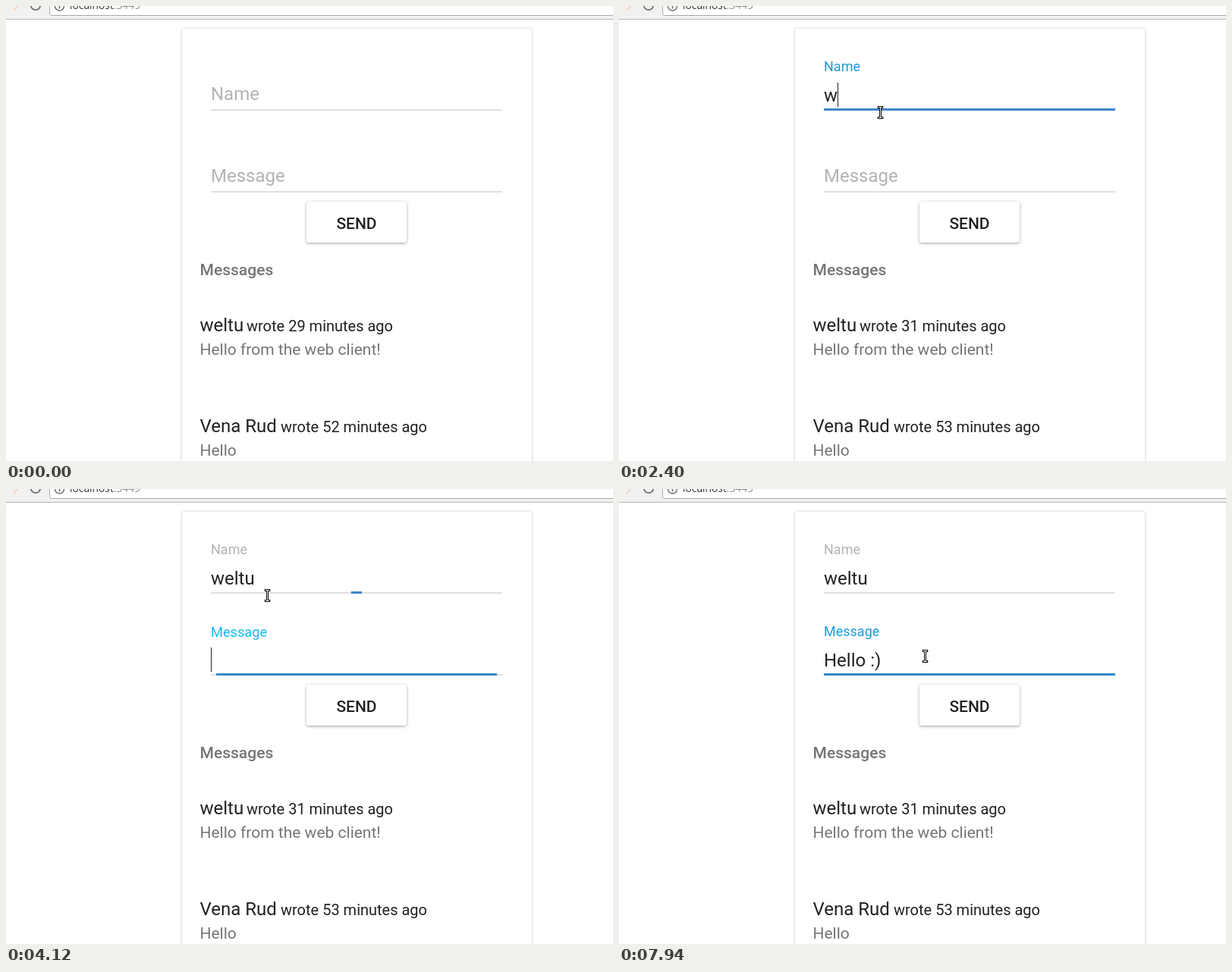
Animation, 800 px wide and 600 px high, one loop 7.99 s. Source, as an HTML page:

```html
<!DOCTYPE html>
<html lang="en">
<head>
<meta charset="utf-8">
<title>Message form</title>
<style>
html, body { margin: 0; width: 100%; height: 100%; overflow: hidden; background: #fff; }
body { position: relative; font-family: Roboto, sans-serif; }
.paper { position: absolute; background: #fff; border-radius: 3px; }
.card { left: 232px; top: 30px; width: 461px; height: 640px;
  box-shadow: 0 0 4px rgba(0, 0, 0, .2), 0 1px 2px rgba(0, 0, 0, .1); }
.button { left: 396px; top: 258px; width: 132px; height: 54px;
  box-shadow: 0 1px 4px rgba(0, 0, 0, .28), 0 1px 2px rgba(0, 0, 0, .12); }
svg { position: absolute; left: 0; top: 0; width: 800px; height: 600px; overflow: hidden; }
text { white-space: pre; fill: #212121; font-size: 24px; }
.small { font-size: 20px; }
.body { font-size: 21px; fill: #757575; }
.strong { font-size: 21px; font-weight: 500; }
.url { font: 13.8px "Open Sans", "Noto Sans", sans-serif; fill: #333; }

/* One loop is 7990 ms: name focus at 1690, message focus at 3780, 450 ms each */
.anim { --ease: cubic-bezier(.23, 1, .32, 1);
  animation-duration: 7990ms; animation-iteration-count: infinite; animation-timing-function: linear; }
.label { fill: #b3b3b3; }
.bar { transform-box: fill-box; transform-origin: center; }
#nameLabel { animation-name: nameFloat, nameTint; }
#messageLabel { animation-name: messageFloat, messageTint; }
#nameBar { fill: #3f85c8; animation-name: nameBar; }
#messageBar { fill: #358bc6; animation-name: messageBar; }
#messageLine { animation-name: thinLine; animation-timing-function: step-end; }

@keyframes nameFloat {
  0%, 21.151% { transform: translate(270px, 124px) scale(1); animation-timing-function: var(--ease); }
  26.783%, 100% { transform: translate(270px, 86px) scale(.75); }
}
@keyframes messageFloat {
  0%, 47.309% { transform: translate(270px, 232px) scale(1); animation-timing-function: var(--ease); }
  52.941%, 100% { transform: translate(270px, 194px) scale(.75); }
}
@keyframes nameTint {
  0%, 21.151% { fill: #b3b3b3; animation-timing-function: var(--ease); }
  26.75% { fill: #14b2ee; }
  26.783%, 47.309% { fill: #1f97d8; animation-timing-function: var(--ease); }
  52.941%, 100% { fill: #b3b3b3; }
}
@keyframes messageTint {
  0%, 47.309% { fill: #b3b3b3; animation-timing-function: var(--ease); }
  52.04% { fill: #10bcf2; }
  52.065%, 100% { fill: #149cdf; }
}
@keyframes nameBar {
  0%, 21.151% { transform: scaleX(0); animation-timing-function: var(--ease); }
  26.783%, 47.309% { transform: scaleX(1); animation-timing-function: var(--ease); }
  52.941%, 100% { transform: scaleX(0); }
}
@keyframes messageBar {
  0%, 47.309% { transform: scaleX(0); animation-timing-function: var(--ease); }
  52.941%, 100% { transform: scaleX(1); }
}
@keyframes thinLine {
  0% { y: 244px; height: 2px; }
  21.151% { y: 245px; height: 1px; }
  26.783%, 100% { y: 244px; height: 2px; }
}
</style>
</head>
<body>
<div class="paper card"></div>
<div class="paper button"></div>
<svg viewBox="0 0 800 600">
  <!-- browser toolbar -->
  <rect width="800" height="17" fill="#f2f1f0"/>
  <rect y="17" width="800" height="1" fill="#b5b4b3"/>
  <rect x="57.5" y="-20" width="760" height="32.5" rx="3" fill="#fff" stroke="#a8a7a6"/>
  <path d="M9.5 6L17 -1.5" stroke="#f3cfb4" stroke-width="1.6"/>
  <circle cx="39" cy="-1" r="6.2" fill="none" stroke="#6b6b6b" stroke-width="1.8"/>
  <circle cx="70.5" cy="0" r="6" fill="none" stroke="#6b6b6b" stroke-width="1.4"/>
  <path d="M70.5 -1V3.5" stroke="#6b6b6b" stroke-width="1.6"/>
  <text class="url" x="84" y="4">localhost<tspan fill="#8c8c8c">:3449</tspan></text>

  <!-- form -->
  <rect x="270" y="136" width="384" height="2" fill="#e0e0e0"/>
  <rect id="messageLine" class="anim" x="270" y="244" width="384" height="2" fill="#e0e0e0"/>
  <rect id="nameBar" class="anim bar" x="270" y="135" width="384" height="3"/>
  <rect id="messageBar" class="anim bar" x="270" y="243" width="384" height="3"/>
  <text id="nameLabel" class="anim label">Name</text>
  <text id="messageLabel" class="anim label">Message</text>
  <text id="nameInput" x="270" y="126"></text>
  <text id="messageInput" x="270" y="234"></text>
  <rect id="caret" width="1" height="32" fill="#212121" visibility="hidden"/>
  <text class="strong" x="462" y="294" text-anchor="middle">SEND</text>

  <!-- messages -->
  <text class="strong" x="255.5" y="355" style="fill:#757575">Messages</text>
  <text x="255.5" y="429">weltu</text>
  <text class="small" x="317" y="429">wrote <tspan id="ago1">29</tspan> minutes ago</text>
  <text class="body" x="255.5" y="460">Hello from the web client!</text>
  <text x="255.5" y="562">Vena Rud</text>
  <text class="small" x="362" y="562">wrote <tspan id="ago2">52</tspan> minutes ago</text>
  <text class="body" x="255.5" y="593">Hello</text>

  <!-- pointers -->
  <g id="beam" visibility="hidden" fill="none">
    <path d="M-3.75 -7H3.75M0 -7V7M-3.75 7H3.75" stroke="#000" stroke-width="3"/>
    <path d="M-2.75 -7H2.75M0 -7V7M-2.75 7H2.75" stroke="#fff"/>
  </g>
  <path id="arrow" visibility="hidden" d="M.5 .5V15.5L4 12.3L6.4 18L9 16.9L6.6 11.3H11.3Z" fill="#fff" stroke="#000"/>
</svg>
<script>
const LOOP = 7990;
const $ = id => document.getElementById(id);

const fields = [
  { el: $('nameInput'), text: 'weltu', keys: [2400, 2810, 3000, 3200, 3480], top: 101 },
  { el: $('messageInput'), text: 'Hello :)', keys: [5210, 5790, 5910, 6060, 6300, 6680, 7040, 7180], top: 209 }
];
// [time, field index], -1 hides the caret
const caretTrack = [[0, -1], [1690, 0], [3780, 1], [4320, -1], [4940, 1], [7780, -1]];
// [time, shape, x, y]
const pointerTrack = [
  [0, ''],
  [430, 'arrow', 746, 255], [470, 'beam', 601.5, 239.5], [520, 'beam', 462.5, 226.5], [560, 'beam', 384.5, 219.5],
  [770, 'beam', 380.5, 211.5], [830, 'beam', 370.5, 191.5], [890, 'beam', 358.5, 165.5],
  [940, 'beam', 349.5, 147.5], [1000, 'beam', 345.5, 140.5], [1350, 'beam', 344.5, 140.5],
  [7780, 'beam', 348.5, 145.5], [7820, 'beam', 362.5, 164.5], [7860, 'beam', 382.5, 191.5],
  [7900, 'beam', 397.5, 211.5], [7940, 'beam', 403.5, 220.5]
];

const at = (track, t) => track.findLast(step => step[0] <= t);
const show = (el, on) => el.setAttribute('visibility', on ? 'visible' : 'hidden');
const write = (el, text) => { if (el.textContent !== text) el.textContent = text; };

function render(t) {
  for (const f of fields) write(f.el, f.text.slice(0, f.keys.filter(k => k <= t).length));

  const field = fields[at(caretTrack, t)[1]];
  show($('caret'), field);
  if (field) {
    const width = field.el.textContent ? field.el.getComputedTextLength() : 0;
    $('caret').setAttribute('x', 270 + Math.floor(width));
    $('caret').setAttribute('y', field.top);
  }

  write($('ago1'), t < 2400 ? '29' : '31');
  write($('ago2'), t < 2400 ? '52' : '53');

  const [, shape, x, y] = at(pointerTrack, t);
  for (const id of ['beam', 'arrow']) {
    show($(id), id === shape);
    if (id === shape) $(id).setAttribute('transform', `translate(${x} ${y})`);
  }
}

let start;
function frame(now) {
  start ??= now;
  render((now - start) % LOOP);
  requestAnimationFrame(frame);
}
render(0);
requestAnimationFrame(frame);
</script>
</body>
</html>
```
